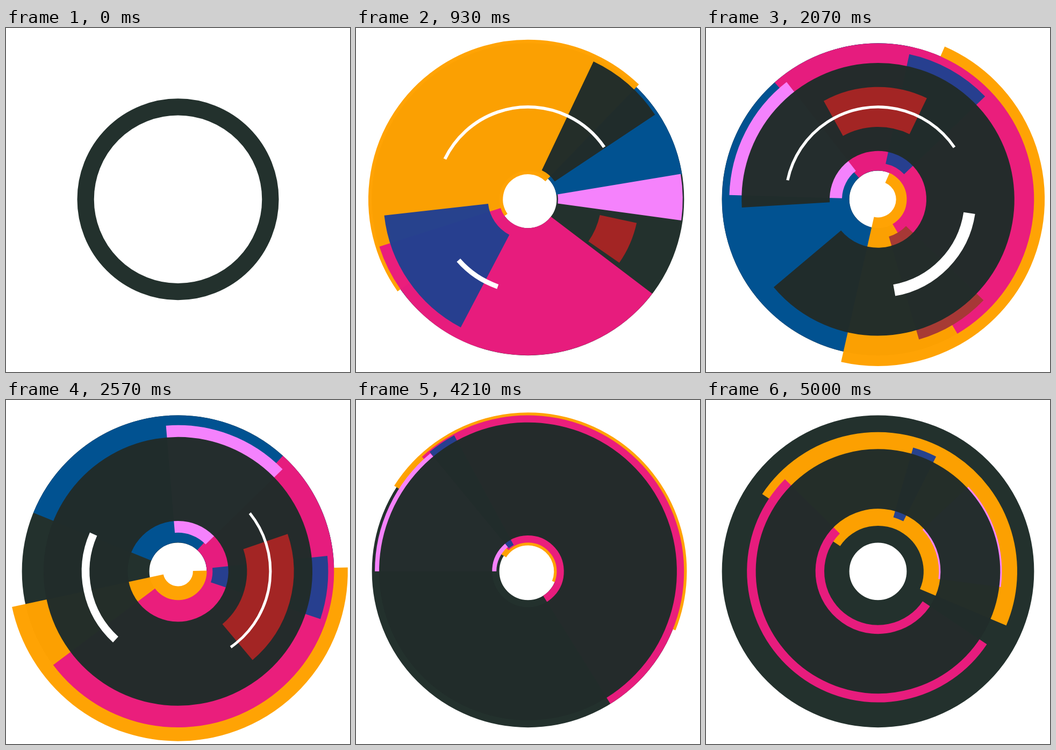
An HTML page with a canvas that plays this animation: 640x640 px, repeating every 5.07 s.

```html
<!DOCTYPE html>
<html lang="en">
<head>
<meta charset="utf-8">
<title>Spinning arcs</title>
<style>
  html, body { margin: 0; width: 100%; height: 100%; overflow: hidden; background: #fff; }
  canvas { display: block; width: 100vmin; height: 100vmin; }
</style>
</head>
<body>
<canvas id="stage" width="640" height="640"></canvas>
<script>
const LOOP = 5070, STEP = 71.4, LAST = 70;
const CX = 320, CY = 318.75, MID = 171.875;
const FULL = 237, THIN = 31.25; // stroke widths of the base ring
const OUTRO = 60;               // step at which everything starts to collapse
const ctx = document.getElementById('stage').getContext('2d');

const clamp = x => Math.min(1, Math.max(0, x));
const mix = (a, b, k) => a + (b - a) * k;
const linear = u => u;
const easeIn = u => u * u;
const easeOut = u => u * (2 - u);

// Angles in degrees, times and rates in steps.
// phase, spin: constant rotation; lean: share of the span added to it;
// settle: extra turn during the outro.
// born, grow, max, dies, fade, least: how the arc opens and closes.
// half: half the stroke width at the start, at the apex, and before the outro;
// rest: half the stroke width after the outro.
const base = { lean: 0, settle: 0, max: 360, dies: Infinity, fade: 1, least: 0, apex: 40, ease: linear, alpha: 0.985 };

const arcs = [
  { color: '#005393', phase: -456.4, spin: 18.29, born: 2, grow: 23, max: 209.4, dies: 74, fade: 7,
    half: [118.4, 118.4, 118.4], rest: 50 },
  { color: '#ffa200', phase: 23.9, spin: 9.3, settle: -101.2, born: 1, grow: 25, max: 169.2,
    half: [114.5, 147.3, 123.6], rest: 87.1 },
  { color: '#ea1c7e', phase: -118.2, spin: 11.956, settle: -324.9, born: 4, grow: 13.9, max: 190.9,
    half: [118.4, 118.4, 118.4], rest: 71.9 },
  { color: '#f884ff', phase: -164.7, spin: 11.944, settle: 5.5, born: 6.2, grow: 2.54, max: 50.4,
    half: [125, 97.2, 113.1], rest: 58.6 },
  { color: '#244190', phase: -15.9, spin: 10.278, settle: -57.7, born: 3, grow: 12, dies: 53.8, fade: 1.37, least: 11,
    half: [91.5, 109.3, 116], rest: 67.4 },
  { color: '#a63935', phase: -371, spin: 14.3, born: 16, grow: 8.6, max: 51.3, dies: 35, fade: 5,
    half: [120, 111.4, 50], apex: 22 },
  { color: '#212c2a', phase: 99.5, spin: 15.07, born: 11.31, grow: 18.28,
    half: [159, 78.1, 105.1], rest: 55.5, apex: 37, ease: easeOut },
  { color: '#a52524', phase: -173.6, spin: 14.3, born: 1.8, grow: 2.01, dies: 59, fade: 3.5,
    half: [35, 35, 95], apex: 22, ease: easeIn },
  { color: '#fff', alpha: 1, phase: -104.1, spin: 17.7, lean: -0.57, born: 1.9, grow: 2.67, max: 71.3, dies: 58, fade: 3.25,
    half: [-9.6, 14.3, -4.2], apex: 22 },
  { color: '#fff', alpha: 1, phase: -127.9, spin: 21.2, lean: 0.486, born: 0.4, grow: 9.5, max: 171, dies: 52.6, fade: 5.67,
    half: [3.2, 2.8, 2], apex: 22 }
].map(a => ({ ...base, ...a }));

function spanAt(a, s) {
  const closing = Math.max(a.least, (a.dies - s) * a.fade);
  return Math.min((s - a.born) * a.grow, a.max, closing);
}

function halfAt(a, s, outro) {
  const [from, apex, to] = a.half;
  const half = s < a.apex
    ? mix(from, apex, a.ease(s / a.apex))
    : mix(apex, to, a.ease(clamp((s - a.apex) / (OUTRO - 1 - a.apex))));
  return mix(half, a.rest ?? half, outro);
}

function ring(color, from, span, width) {
  if (span <= 0 || width <= 0) return;
  const rad = Math.PI / 180;
  ctx.beginPath();
  ctx.arc(CX, CY, MID, from * rad, (from + span) * rad);
  ctx.strokeStyle = color;
  ctx.lineWidth = width;
  ctx.stroke();
}

function draw(s) {
  ctx.globalAlpha = 1;
  ctx.fillStyle = '#fff';
  ctx.fillRect(0, 0, 640, 640);

  const grow = mix(THIN / FULL, 1, easeOut(clamp(s / 8)));
  const outro = clamp((s - OUTRO) / (LAST - OUTRO));
  ring('#23312d', 0, 360, FULL * grow);

  for (const a of arcs) {
    const span = spanAt(a, s);
    const turn = a.phase + a.spin * s + a.lean * span + a.settle * outro;
    ctx.globalAlpha = a.alpha;
    ring(a.color, turn % 360, span, 2 * halfAt(a, s, outro) * grow);
  }
}

const began = performance.now();
function tick() {
  const t = (performance.now() - began) % LOOP;
  draw(Math.min(LAST, Math.floor((t + 6) / STEP)));
  requestAnimationFrame(tick);
}
tick();
</script>
</body>
</html>
```
